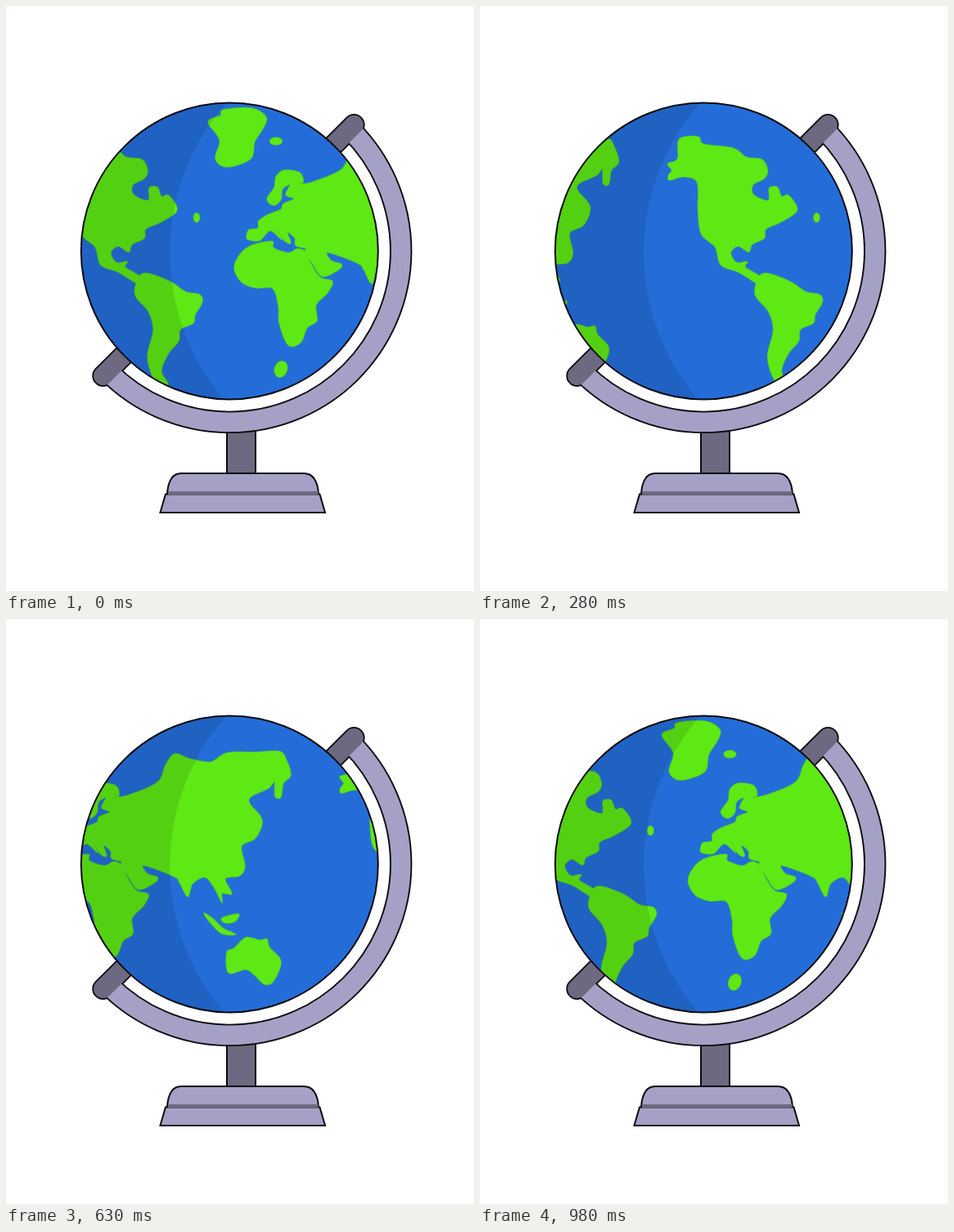
Recreate the animation shown at these times as an HTML page with a canvas. Size 572x716 px, loop 1050 ms.

```html
<!DOCTYPE html>
<html lang="en">
<head>
<meta charset="utf-8">
<title>Spinning globe</title>
<style>
  html, body { margin: 0; width: 100%; height: 100%; overflow: hidden; background: #fff; }
  canvas { display: block; }
</style>
</head>
<body>
<canvas id="stage" width="572" height="716"></canvas>
<script>
const ctx = document.getElementById('stage').getContext('2d');
const TAU = Math.PI * 2;
const CX = 273.3, CY = 300, R = 181.5;
const LOOP = 1050, STEP = 70, PERIOD = 582;
const INK = '#0b0b10', PALE = '#a5a1c6', DARK = '#6d6980';

// the turn advances by one or two notches per held pose
const notch = pose => Math.floor(pose * 1.55 + 0.96);
const shiftAt = n => n <= 18 ? n * 25.5 : 459 + (n - 18) * 24.6;

const land = new Path2D();

// closed smooth curve through the points
function addLand(dx, text) {
  const p = text.trim().split(/\s+/).map(s => s.split(',').map(Number));
  const at = i => p[(i + p.length) % p.length];
  land.moveTo(p[0][0] + dx, p[0][1]);
  p.forEach((b, i) => {
    const a = at(i - 1), c = at(i + 1), d = at(i + 2);
    land.bezierCurveTo(
      b[0] + (c[0] - a[0]) / 6 + dx, b[1] + (c[1] - a[1]) / 6,
      c[0] - (d[0] - b[0]) / 6 + dx, c[1] - (d[1] - b[1]) / 6,
      c[0] + dx, c[1]);
  });
  land.closePath();
}

function addIsle(x, y, rx, ry, turn = 0) {
  const isle = new Path2D();
  isle.ellipse(x, y, rx, ry, turn, 0, TAU);
  land.addPath(isle);
}

const europe = `171,282 174,274 185,272 186,263 198,255 213,249 216,242 229,236 219,231
  224,219 215,224 213,237 204,244 196,236 205,222 207,209 217,201 236,204 240,216 231,218`;
const asia = `250,216 287,200 297,179 308,165 326,171 352,175 372,164 407,163 436,162 444,171
  450,191 441,201 438,218 431,217 430,199 423,207 402,217 400,226 415,246 407,268 390,278
  394,302 388,314 370,318 378,336 366,336 366,347 356,328 345,316 330,324 324,340 314,322
  309,316`;
const southCoast = `285,306 269,302 275,312 287,316 283,323 264,331 252,316 243,300 244,297
  231,293 230,284 221,277 225,290 217,287 208,272 214,286 200,275 187,287 173,286`;
addLand(123, `${europe} ${asia} ${southCoast}`);

const africa = `279,321 286,304 300,293 325,288 327,296 345,302 357,297 369,303 372,314
  384,332 399,337 393,351 379,366 380,385 368,394 360,412 345,415 334,388 333,368 326,346
  305,345 288,338`;
addLand(0, africa);

const greenland = `247,142 262,134 266,127 300,125 318,136 314,150 304,166 299,187 270,197
  256,187 261,164`;
addLand(0, greenland);

const northAmerica = `154,207 158,201 153,193 165,187 167,163 190,160 197,169 233,174 249,185
  268,188 275,201 271,211 257,219 258,231 276,238 277,223 287,222 292,233 301,232 311,250
  292,264 273,273 271,284 256,292 252,301 239,294 230,302 237,314 250,313 248,320 267,332
  265,341 240,326 218,317 211,295 194,279 190,250 189,216 173,209 155,213`;
addLand(-102, northAmerica);

const southAmerica = `260,354 263,335 273,327 302,337 322,350 338,353 342,362 333,378 331,388
  315,396 313,410 300,426 292,447 300,463 285,460 275,430 282,397 276,374`;
addLand(-102, southAmerica);

const australia = `270,408 279,403 293,390 310,393 319,392 322,402 336,419 327,443 316,447
  304,436 293,429 272,433`;
addLand(225, australia);

addLand(225, '242,360 253,367 266,379 281,386 264,385 250,372');
addLand(225, '264,366 284,361 280,370 268,372');
addIsle(330, 165.5, 7.5, 4.5);
addIsle(336, 444.5, 7.5, 10, 0.35);
addIsle(233, 259, 3.6, 5.6);

const ring = new Path2D();
ring.arc(CX, CY, 209.4, -Math.PI / 4, Math.PI * 3 / 4);

const disc = new Path2D();
disc.arc(CX, CY, R, 0, TAU);

const pins = new Path2D('M425.3 145.3L390 180.6M118.6 452.7L154 417.3');
const stem = new Path2D('M270 515H305V572H270Z');
const baseTop = new Path2D('M197 597C198 584 202 572 214 572H364C377 572 381 584 382 597Z');
const baseFoot = new Path2D('M195 597.5H383.5L390 620H188.5Z');
const shade = new Path2D('M270 110V118A277 277 0 0 0 267 482V490H80V110Z');

function paint(path, fill) {
  ctx.fillStyle = fill;
  ctx.fill(path);
  band(path, INK, 2);
}

function band(path, color, width, cap = 'butt') {
  ctx.strokeStyle = color;
  ctx.lineWidth = width;
  ctx.lineCap = cap;
  ctx.stroke(path);
}

function drawStand() {
  paint(stem, DARK);
  paint(baseTop, PALE);
  paint(baseFoot, PALE);
  ctx.fillStyle = DARK;
  ctx.fillRect(198, 594, 183.5, 4.5);
  band(ring, INK, 27.4);
  band(pins, INK, 26.6, 'round');
  band(ring, PALE, 23.6);
  band(pins, DARK, 23, 'round');
}

function drawGlobe(shift) {
  ctx.save();
  ctx.clip(disc);
  ctx.fillStyle = '#246dd8';
  ctx.fillRect(80, 110, 390, 380);
  ctx.lineJoin = 'round';
  for (const tile of [0, -PERIOD]) {
    ctx.save();
    ctx.translate(shift + tile, 0);
    band(land, '#45b54a', 1.6);
    ctx.fillStyle = '#5ee814';
    ctx.fill(land);
    ctx.restore();
  }
  ctx.fillStyle = 'rgba(0,0,0,.1)';
  ctx.fill(shade);
  ctx.restore();
  band(disc, INK, 2);
}

function draw(now) {
  const pose = Math.floor((now % LOOP) / STEP);
  ctx.fillStyle = '#fff';
  ctx.fillRect(0, 0, 572, 716);
  drawStand();
  drawGlobe(shiftAt(notch(pose)));
}

function tick(now) {
  draw(Math.max(0, now));
  requestAnimationFrame(tick);
}

draw(0);
requestAnimationFrame(tick);
</script>
</body>
</html>
```
